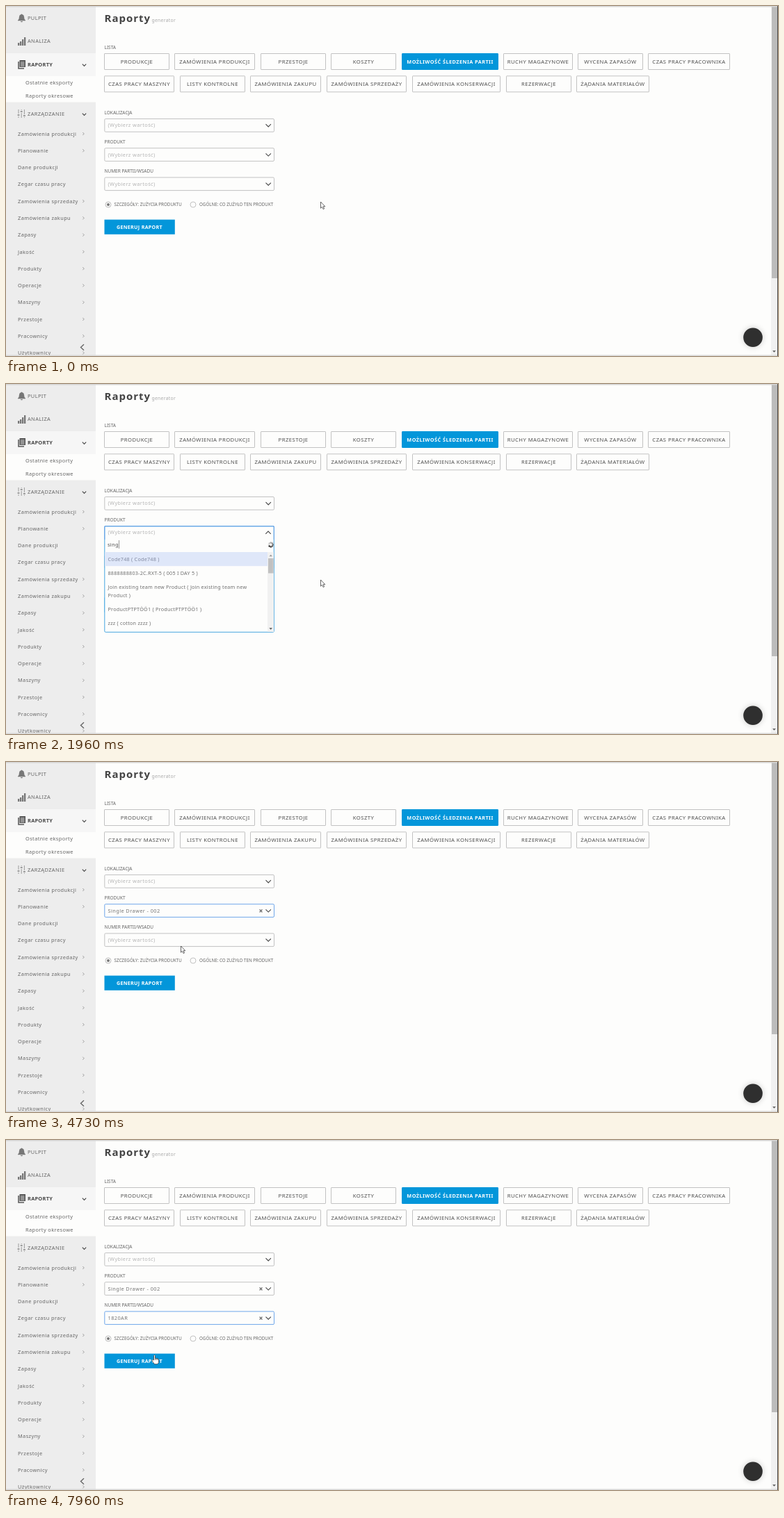
Animation, 1110 px wide and 504 px high, one loop 8 s. Source, as an HTML page with a canvas:

```html
<!DOCTYPE html>
<html lang="pl">
<head>
<meta charset="utf-8">
<title>Raporty</title>
<style>
html, body { margin: 0; width: 100%; height: 100%; overflow: hidden; background: #fdfdfc; }
canvas { display: block; }
</style>
</head>
<body>
<canvas id="stage" width="1110" height="504"></canvas>
<script>
const ctx = document.getElementById('stage').getContext('2d');
const LOOP = 8000;
const BLUE = '#0396da', FOCUS = '#6ea6ea', MENU = '#45a6e0', PAPER = '#fdfdfc', BORDER = '#c2c2c2';
const ITEM = 'Single Drawer', LOT = '1820AR', HINT = '(Wybierz wartość)';

// Spans of activity; the picture rests between them.
const SPANS = [[260, 1000], [1100, 1760], [1900, 2060], [2200, 3000], [3100, 3460], [3600, 3660],
  [3800, 4060], [4200, 4200], [4400, 4400], [4730, 4900], [5060, 5660], [5800, 6060],
  [6230, 6560], [6700, 7460], [7630, 7630], [7900, 7960]];

const POINTER = [[260, 452.5, 282], [520, 340, 209], [720, 340, 209], [1000, 452.5, 282],
  [3800, 452.5, 282], [3900, 345, 213], [4030, 251.5, 265], [4730, 251.5, 265],
  [4830, 225, 259], [4900, 236, 257], [7100, 236, 257], [7400, 227.5, 297],
  [7900, 227.5, 297], [7960, 213.5, 309]];

const ITEM_KEYS = [620, 1340, 1560, 1700, 1900, 2260, 2430, 2600, 2830, 3000, 3140];
const LOT_KEYS = [5060, 5830, 6000, 6260, 6430];

const ARROW = new Path2D('M0 0V9.2L2 7.3 3.6 10.6 5.1 9.9 3.6 6.7H6.3z');
const HAND = new Path2D('M3 8V1.5Q4-.3 5 1.5V5.5Q9 5 10 7V10Q10 12.5 8.3 13.8H4Q2 11 .4 8.6 1 6.8 3 8z');

function text(s, x, y, { size = 7.4, gap = .4, color = '#666', weight = 400, align = 'left' } = {}) {
  ctx.font = `${weight} ${size}px "Noto Sans", "Open Sans", sans-serif`;
  ctx.letterSpacing = gap + 'px';
  ctx.fillStyle = color;
  ctx.textAlign = align;
  ctx.fillText(s, x, y + size * .36);
  return ctx.measureText(s).width;
}

function rect(x, y, w, h, color) {
  ctx.fillStyle = color;
  ctx.fillRect(x, y, w, h);
}

function box(x, y, w, h, border, fill = PAPER, r = 1.5) {
  ctx.beginPath();
  ctx.roundRect(x + .5, y + .5, w - 1, h - 1, r);
  ctx.fillStyle = fill;
  ctx.fill();
  ctx.strokeStyle = border;
  ctx.lineWidth = 1;
  ctx.stroke();
}

function line(points, color, width = 1) {
  ctx.beginPath();
  for (let i = 0; i < points.length; i += 2) ctx.lineTo(points[i], points[i + 1]);
  ctx.strokeStyle = color;
  ctx.lineWidth = width;
  ctx.stroke();
}

function disc(x, y, r, fill, border) {
  ctx.beginPath();
  ctx.arc(x, y, r, 0, 7);
  if (fill) { ctx.fillStyle = fill; ctx.fill(); }
  if (border) { ctx.strokeStyle = border; ctx.lineWidth = .9; ctx.stroke(); }
}

function triangle(x, y, r, dir, color = '#555') {
  ctx.beginPath();
  ctx.moveTo(x - r, y - dir * r / 2);
  ctx.lineTo(x + r, y - dir * r / 2);
  ctx.lineTo(x, y + dir * r / 2);
  ctx.fillStyle = color;
  ctx.fill();
}

const chevron = (x, y, r, dir) =>
  line([x - r, y - dir * r / 2, x, y + dir * r / 2, x + r, y - dir * r / 2], '#444', 1.1);

function icons() {
  const grey = '#777';
  ctx.fillStyle = grey;
  ctx.fill(new Path2D('M17 20.5Q19 19 19 15.5 19 12.8 21.4 12.2 22.5 10.8 23.6 12.2 26 12.8 26 15.5 26 19 28 20.5V21.3H17zM20.7 22H24.3Q22.5 24.6 20.7 22z'));
  [4, 6, 9, 12].forEach((h, i) => rect(17 + i * 3, 57 - h, 2.3, h, grey));
  rect(19.5, 78, 8.5, 10, '#555');
  line([18, 80, 18, 90, 26, 90], '#555', 1.5);
  for (const y of [80.5, 83, 85.5]) rect(21, y, 5.5, 1, '#eee');
  [[18, 157], [22.2, 152], [26.4, 158]].forEach(([x, y]) => {
    line([x, 149, x, y - 2], '#888', .8);
    line([x, y + 2, x, 161], '#888', .8);
    rect(x - 1.4, y - .7, 2.8, 1.4, grey);
  });
}

function sidebar() {
  rect(0, 0, 129, 504, '#ededed');
  rect(0, 68, 129, 33, '#f6f6f6');
  rect(0, 101, 129, 37.5, PAPER);
  icons();
  text('PULPIT', 31, 17);
  text('ANALIZA', 31, 50.5);
  text('RAPORTY', 31, 84, { weight: 700, gap: .25, color: '#444' });
  text('ZARZĄDZANIE', 31, 155.3);
  chevron(112.5, 85, 2.7, 1);
  chevron(112.5, 156, 2.7, 1);
  text('Ostatnie eksporty', 28, 110);
  text('Raporty okresowe', 28, 129);
  const items = ['Zamówienia produkcji', 'Planowanie', 'Dane produkcji', 'Zegar czasu pracy',
    'Zamówienia sprzedaży', 'Zamówienia zakupu', 'Zapasy', 'Jakość', 'Produkty', 'Operacje',
    'Maszyny', 'Przestoje', 'Pracownicy', 'Użytkownicy'];
  items.forEach((s, i) => {
    const y = 184 + i * 24.27;
    text(s, 17, y);
    if (i !== 2 && i !== 3) line([110.3, y - 2, 112.3, y, 110.3, y + 2], '#888', .8);
  });
  line([112, 487.3, 107.5, 491.5, 112, 495.7], '#666', 1.4);
}

function tabs() {
  const rows = [
    [['PRODUKCJE', 141, 94], ['ZAMÓWIENIA PRODUKCJI', 242, 116], ['PRZESTOJE', 366, 94],
      ['KOSZTY', 467, 94], ['MOŻLIWOŚĆ ŚLEDZENIA PARTII', 569, 139], ['RUCHY MAGAZYNOWE', 715, 100],
      ['WYCENA ZAPASÓW', 822, 94], ['CZAS PRACY PRACOWNIKA', 923, 118]],
    [['CZAS PRACY MASZYNY', 141, 101], ['LISTY KONTROLNE', 250, 94], ['ZAMÓWIENIA ZAKUPU', 351, 102],
      ['ZAMÓWIENIA SPRZEDAŻY', 461, 115], ['ZAMÓWIENIA KONSERWACJI', 584, 127],
      ['REZERWACJE', 719, 94], ['ŻĄDANIA MATERIAŁÓW', 820, 105]]];
  rows.forEach((row, r) => row.forEach(([s, x, w]) => {
    const y = 68 + r * 32.3, on = s.startsWith('MOŻ');
    box(x, y, w, 24, on ? BLUE : BORDER, on ? BLUE : PAPER, .5);
    text(s, x + w / 2, y + 12, on
      ? { size: 7.3, gap: .45, weight: 700, color: '#fff', align: 'center' }
      : { size: 7.7, gap: .45, color: '#505050', align: 'center' });
  }));
}

function select(label, y, value, focus) {
  text(label, 141.5, y - 8.5, { size: 6.5, gap: 0 });
  box(141.3, y, 244.7, 19.7, focus ? FOCUS : BORDER);
  text(value || HINT, 146.5, y + 9.7, { color: value ? '#777' : '#b5b5b5' });
  chevron(377.2, y + 10, 3.7, 1);
  if (value) {
    line([364.6, y + 8.2, 368.4, y + 12.2], '#666', 1.3);
    line([368.4, y + 8.2, 364.6, y + 12.2], '#666', 1.3);
  }
}

function form(t) {
  select('LOKALIZACJA', 162, '');
  select('PRODUKT', 204.2, t >= 4400 && ITEM + ' - 002', t >= 4400 && t < 5060);
  select('NUMER PARTII/WSADU', 246.4, t >= 7630 && LOT, t >= 7630);
  const small = { size: 6.2, gap: .02 };
  disc(147, 286, 4, PAPER, '#b5b5b5');
  disc(147, 286, 2, '#777');
  text('SZCZEGÓŁY: ZUŻYCIA PRODUKTU', 155.5, 286, small);
  disc(269, 286, 4, PAPER, '#bbb');
  text('OGÓLNE: CO ZUŻYŁO TEN PRODUKT', 278, 286, small);
  rect(141.5, 307.6, 101.3, 21.2, BLUE);
  text('GENERUJ RAPORT', 192, 318.7, { size: 7.1, gap: .32, weight: 700, color: '#fff', align: 'center' });
}

function spinner(x, y, t) {
  const step = Math.floor(t / 53);
  for (let i = 0; i < 8; i++) {
    const a = (i + step) * Math.PI / 4;
    disc(x + 2.9 * Math.cos(a), y + 2.9 * Math.sin(a), 1.25, `rgba(40,40,40,${(i + 1) / 8})`);
  }
}

// Open select: its own row, a search field and the results below.
function dropdown(t, { y, bottom, typed, keys, rows = [], active = 0, busy, bar }) {
  const top = y + 38;
  box(141.3, y + .3, 244.5, bottom - y - .5, MENU);
  line([141.8, y + 20, 141.8, y + .8, 385.3, y + .8, 385.3, y + 20], FOCUS);
  text(HINT, 146.5, y + 9.7, { color: '#b5b5b5' });
  chevron(377, y + 10, 3.7, -1);

  const count = keys.filter(k => k <= t).length - 1;
  const w = text(typed.slice(0, count), 146, y + 27.2, { size: 7.5, gap: .25, color: '#505050' });
  if ((t - keys[count]) % 1060 < 520) rect(Math.round(146 + (count && w)), y + 21, 1, 12, '#999');

  if (busy) spinner(380.8, y + 27.5, t);
  else {
    disc(378, y + 24.3, 2.2, null, '#555');
    line([379.6, y + 26, 382, y + 28.3], '#555', 1.5);
  }
  if (!rows.length) text('…', 143.5, top + 5, { size: 6, gap: 0, color: '#ccc' });

  let at = top;
  rows.forEach((row, i) => {
    const lines = row.split('\n'), h = 20.2 + (lines.length - 1) * 12;
    if (i === active) rect(142, at, bar ? 234 : 243, Math.min(h, bottom - 1 - at), '#dfe7f9');
    lines.forEach((s, j) => text(s, 146.5, at + 10 + j * 12,
      { size: 7.2, gap: .25, color: i === active ? '#8189a0' : '#6f6f6f' }));
    at += h;
  });
  if (bar) {
    rect(376, top, 9, bottom - top - 1, '#f1f1f1');
    rect(377, top + 9, 7.5, 21.5, '#c1c1c1');
    triangle(380.7, top + 5, 2.3, -1, '#999');
    triangle(380.7, bottom - 5.5, 2.3, 1);
  }
}

function openSelect(t) {
  if (t >= 620 && t < 4400) {
    const base = { y: 204, typed: 'single drawer', keys: ITEM_KEYS };
    if (t < 1760) return { ...base, bottom: 254, busy: true };
    if (t < 3600) return { ...base, bottom: 358, busy: true, bar: true, rows: [
      'Code748 ( Code748 )', '8888888803-2C.RXT-5 ( 005 I DAY 5 )',
      'Join existing team new Product ( Join existing team new\nProduct )',
      'ProductPTPTÖÖ1 ( ProductPTPTÖÖ1 )', 'zzz ( cotton zzzz )'] };
    return { ...base, bottom: 303, active: t < 4050 ? 0 : 1,
      rows: [`${ITEM} ( ${ITEM} )`, ITEM + ' - 002', ITEM + ' - WIP'] };
  }
  if (t >= 5060 && t < 7630) {
    const base = { y: 246, typed: LOT, keys: LOT_KEYS };
    if (t < 5650) return { ...base, bottom: 296, busy: true };
    return { ...base, bottom: 305, rows: [LOT], busy: t >= 5830 && t < 7000 };
  }
}

function pointerAt(t) {
  const n = POINTER.findIndex(p => p[0] > t);
  if (n === 0) return POINTER[0].slice(1);
  if (n < 0) return POINTER.at(-1).slice(1);
  const [a, x, y] = POINTER[n - 1], [b, u, v] = POINTER[n];
  const k = (t - a) / (b - a), e = k * k * (3 - 2 * k);
  return [x + (u - x) * e, y + (v - y) * e];
}

function pointer(t, menu) {
  const [x, y] = pointerAt(t);
  const hand = x < 386 && (menu ? menu.rows && y > menu.y + 38 : y > 307);
  const shape = hand ? HAND : ARROW;
  ctx.save();
  ctx.translate(hand ? x - 4 : x, y);
  ctx.fillStyle = '#fff';
  ctx.fill(shape);
  ctx.strokeStyle = '#333';
  ctx.lineWidth = .75;
  ctx.stroke(shape);
  if (hand) for (const i of [5, 6.7, 8.4]) line([i, 5.7, i, 8], '#333', .6);
  ctx.restore();
}

function chrome() {
  rect(1100, 0, 9, 504, '#f1f1f1');
  rect(1101, 0, 8, 392, '#bcbcbc');
  triangle(1104.5, 497.5, 2.4, 1);
  rect(0, 0, 1110, 1.5, '#d6d6d6');
  rect(0, 502.5, 1110, 1.5, '#d9d9d9');
  rect(1109, 0, 1, 504, '#4a4a4a');
  ctx.save();
  ctx.shadowColor = 'rgba(0,0,0,.2)';
  ctx.shadowBlur = 8;
  disc(1074, 477.3, 13.8, '#2f2f2f');
  ctx.restore();
}

function clock(t) {
  let now = 0;
  for (const [a, b] of SPANS) if (t >= a) now = Math.min(t, b);
  return now;
}

function draw(ms) {
  const t = clock(ms % LOOP);
  rect(0, 0, 1110, 504, PAPER);
  sidebar();
  text('Raporty', 141.5, 17.8, { size: 15, gap: 1, color: '#444', weight: 600 });
  text('generator', 209.5, 20.5, { size: 6.8, gap: .3, color: '#aaa' });
  text('LISTA', 141.5, 59.5, { size: 6.5, gap: 0 });
  tabs();
  form(t);
  const menu = openSelect(t);
  if (menu) dropdown(t, menu);
  chrome();
  pointer(t, menu);
}

let start;
function tick(now) {
  start ??= now;
  draw(now - start);
  requestAnimationFrame(tick);
}
requestAnimationFrame(tick);
</script>
</body>
</html>
```
